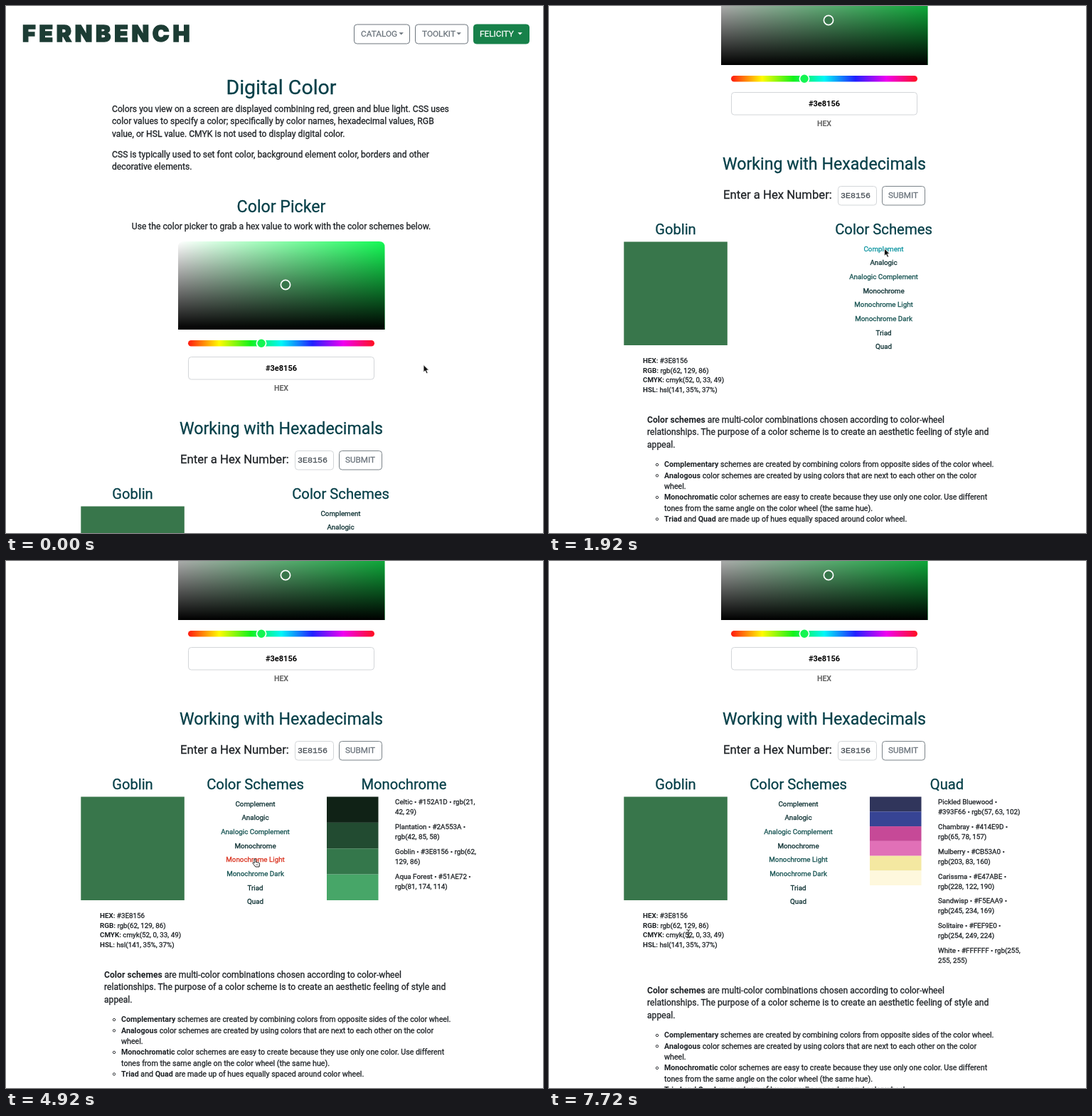
These frames come from a looping animation (755x741 px, 7.74 s). An HTML page:

```html
<!DOCTYPE html>
<html lang="en">
<head>
<meta charset="utf-8">
<title>Digital Color</title>
<style>
  html, body { margin: 0; width: 100%; height: 100%; overflow: hidden; background: #fff; }
  svg { display: block; }
  text {
    font-family: Roboto, sans-serif; white-space: pre;
    color: #1d2125; fill: currentColor; stroke: currentColor; stroke-width: .28;
  }
  .mid { text-anchor: middle; }
  .head { color: #063f48; }
  .btn { color: #6c757d; }
  .bold, tspan { font-weight: 700; stroke: none; }
  .mono { font-family: "Liberation Mono", monospace; color: #495057; }
  .logo { font-family: Inter, sans-serif; font-weight: 900; letter-spacing: 4.7px; color: #1c3c34; stroke-width: 1.4; }
</style>
</head>
<body>
<svg id="stage" width="755" height="741" viewBox="0 0 755 741"></svg>
<script>
const LOOP = 7740, SCROLL = 372;
const BODY = 12.17, SMALL = 9.8, LIST = 10.66;

const links = ['Complement', 'Analogic', 'Analogic Complement', 'Monochrome',
  'Monochrome Light', 'Monochrome Dark', 'Triad', 'Quad'];
const rowPitch = 19.68, rowTop = 713;

// Each entry: name and hex, with "|" where the caption wraps.
const schemes = [
  ['Cannon Pink #813E69 •|rgb'],
  ['Amazon #3C7651 • rgb(60,|', 'Viridian #3D7C6B • rgb(61,|', 'Oracle #3E7A81 • rgb(62,|', 'Bismark #3F6487 •|rgb'],
  ['Cosmic #763C61 • rgb(118,|', 'Camelot #7C3D4E • rgb(124,|', 'Lotus #81453E • rgb(129,|', 'Shingle #87623F • rgb(135,|'],
  ['Celtic #152A1D • rgb(21,|', 'Plantation #2A553A •|rgb', 'Goblin #3E8156 • rgb(62,|', 'Aqua Forest #51AE72 •|rgb'],
  ['Goblin #3E8156 • rgb(62,|', 'Aqua Forest #51AE72 •|rgb', 'Silver #BFBFBF • rgb(191,|', 'Alto #DFDFDF • rgb(223,|'],
  ['Celtic #152A1D • rgb(21,|', 'Plantation #2A553A •|rgb', 'Granite Gray #606060 •|rgb', 'Gray #7F7F7F • rgb(127,|'],
  ['Martinique #3A3666 •|rgb', 'Butterfly Bush #5A4A9D •|rgb', 'Santa Fe #B2754F •|rgb', 'Tacao #E0A97A • rgb(224,|'],
  ['Pickled Bluewood •|#393F66 • rgb', 'Chambray #414E9D •|rgb', 'Mulberry #CB53A0 •|rgb', 'Carissma #E47ABE •|rgb',
    'Sandwisp #F5EAA9 •|rgb', 'Solitaire #FEF9E0 •|rgb', 'White #FFFFFF • rgb(255,|']
];
const clicks = [2080, 2900, 3960, 4420, 4960, 5540, 6120, 6640];

// Pointer path: time, x, y
const path = [
  [0, 587, 504.5], [500, 587, 504.5], [900, 587, 512], [1250, 587, 512], [1880, 471.5, 341],
  [2150, 471.5, 341], [2650, 352, 361], [3050, 352, 361], [3450, 352, 380], [4040, 351, 380],
  [4320, 351, 400], [4500, 350, 400], [4780, 350, 419], [5080, 350, 419], [5400, 349, 440],
  [5650, 349, 440], [5940, 348, 461], [6220, 348, 461], [6480, 348, 479], [6900, 348, 479], [7560, 196, 524]
];

const text = (x, y, size, str, cls = '', color = '') =>
  `<text x="${x}" y="${y}" font-size="${size}" class="${cls}" ${color && `style="color:${color}"`}>${str}</text>`;
const box = (x, y, w, h, stroke, fill = '#fff') =>
  `<rect x="${x}" y="${y}" width="${w}" height="${h}" rx="4" fill="${fill}" stroke="${stroke}"/>`;
const caret = (x, fill) => `<path d="M${x} 37.3h6.4l-3.2 3.3z" fill="${fill}"/>`;
const lines = (x, y, pitch, size, rows) =>
  rows.map((row, i) => text(x, y + i * pitch, size, row)).join('');
const knob = (x, y, fill) =>
  `<circle cx="${x}" cy="${y}" r="6.6" fill="${fill}" stroke="#fff" stroke-width="1.7"/>`;
const stops = colors => colors.map((c, i) =>
  `<stop offset="${i / (colors.length - 1)}" stop-color="${c}"/>`).join('');

const channels = hex => hex.slice(1).match(/../g).map(c => parseInt(c, 16));
const screenTone = hex =>
  `rgb(${channels(hex).map(c => Math.round(255 * (c / 255) ** 1.12)).join()})`;

function header() {
  return text(23, 50, 32, 'FERNBENCH', 'logo') +
    box(489.5, 26, 78, 27, '#6c757d') + text(499, 43.2, 11.8, 'CATALOG', 'btn') + caret(552.5, '#6c757d') +
    box(575.5, 26, 74, 27, '#6c757d') + text(585, 43.2, 11.8, 'TOOLKIT', 'btn') + caret(633.5, '#6c757d') +
    box(657.5, 26, 78, 27, '#17814a', '#17814a') +
    text(666, 43.2, 11.8, 'FELICITY', 'btn', '#fff') + caret(719.5, '#fff');
}

function intro() {
  return text(387, 123.5, 28.5, 'Digital Color', 'head mid') +
    lines(149, 148.6, 17.5, BODY, [
      'Colors you view on a screen are displayed combining red, green and blue light. CSS uses',
      'color values to specify a color; specifically by color names, hexadecimal values, RGB',
      'value, or HSL value. CMYK is not used to display digital color.']) +
    lines(149, 212.8, 17.5, BODY, [
      'CSS is typically used to set font color, background element color, borders and other',
      'decorative elements.']);
}

function picker() {
  const area = 'M242 455V339q0-8 8-8H524.500q8 0 8 8V455z';
  return text(387, 290.3, 23.2, 'Color Picker', 'head mid') +
    text(387, 313.8, BODY, 'Use the color picker to grab a hex value to work with the color schemes below.', 'mid') +
    `<path d="${area}" fill="url(#sat)"/><path d="${area}" fill="url(#val)"/>` +
    knob(393, 392, '#38764b') +
    '<rect x="256" y="470" width="262" height="8.500" rx="4.250" fill="url(#hue)"/>' +
    knob(359, 474.2, '#14f552') +
    box(256.5, 493.5, 261, 31.5, '#d3d6d9') +
    text(387, 513, 11, '#3e8156', 'mid bold', '#000') +
    text(387, 540.8, 10.6, 'HEX', 'mid bold', '#666');
}

function hexForm() {
  return text(387, 602.3, 23.2, 'Working with Hexadecimals', 'head mid') +
    text(245, 642.5, 16.7, 'Enter a Hex Number:') +
    box(406.5, 625.5, 54, 26.5, '#d3d6d9') + text(410, 642, 11.67, '3E8156', 'mono') +
    box(468.5, 625.5, 60, 26.5, '#7b8389') + text(477, 642.4, 11.7, 'SUBMIT', 'btn');
}

function swatch() {
  const facts = [['HEX', '#3E8156'], ['RGB', 'rgb(62, 129, 86)'],
    ['CMYK', 'cmyk(52, 0, 33, 49)'], ['HSL', 'hsl(141, 35%, 37%)']];
  return text(178, 692.8, 20.1, 'Goblin', 'head mid') +
    '<rect x="105.300" y="703.500" width="145.500" height="145.500" fill="#38764b"/>' +
    lines(132, 873.6, 13.9, SMALL, facts.map(([k, v]) => `<tspan>${k}:</tspan> ${v}`));
}

function notes() {
  const bullets = [0, 1, 3, 5].map(i =>
    `<circle cx="152" cy="${1017 + i * 15.3}" r="1.700" fill="none" stroke="#1d2125" stroke-width=".9"/>`).join('');
  return lines(138, 957.6, 17.5, BODY, [
    '<tspan>Color schemes</tspan> are multi-color combinations chosen according to color-wheel',
    'relationships. The purpose of a color scheme is to create an aesthetic feeling of style and',
    'appeal.']) + bullets +
    lines(162, 1020.3, 15.3, LIST, [
      '<tspan>Complementary</tspan> schemes are created by combining colors from opposite sides of the color wheel.',
      '<tspan>Analogous</tspan> color schemes are created by using colors that are next to each other on the color',
      'wheel.',
      '<tspan>Monochromatic</tspan> color schemes are easy to create because they use only one color. Use different',
      'tones from the same angle on the color wheel (the same hue).',
      '<tspan>Triad</tspan> and <tspan>Quad</tspan> are made up of hues equally spaced around color wheel.']);
}

function panel(title, entries) {
  const h = 145.5 / entries.length;
  return text(559.5, 692.8, 20.2, title, 'head mid') + entries.map((entry, i) => {
    const hex = entry.match(/#\w{6}/)[0], [r, g, b] = channels(hex);
    let [first, second] = entry.replace(/(\w) #/, '$1 • #').split('|');
    second = second ? `${second}(${r}, ${g}, ${b})` : `${g}, ${b})`;
    return `<rect x="451" y="${703.5 + i * h}" width="72.500" height="${h}" fill="${screenTone(hex)}"/>` +
      lines(547, 713.8 + i * 34.9, 14, SMALL, [first, second]);
  }).join('');
}

const pointers = {
  arrow: '<path d="M0 0v10.500l2.400-2.200 1.800 4 1.900-.8-1.800-3.900h3.300z" fill="#111" stroke="#fff" stroke-width=".8"/>',
  hand: '<path d="M-1 1q0-1.500 1.100-1.500T1.200 1v3.500l4 .7q1.500.3 1.400 2L6 11H.8L-2.700 6.500q-.8-1.200.2-1.600T-1 6z" fill="#fff" stroke="#222" stroke-width="1"/><path d="M2 7v2M4 7v2" stroke="#222" stroke-width=".6"/>',
  beam: '<path d="M-2.500-5.500Q0-5.500 0-4Q0-5.500 2.500-5.500M0-4V4.500M-2.500 6Q0 6 0 4.500Q0 6 2.500 6M-1.500 1h3" fill="none" stroke="#222" stroke-width="1"/>'
};

const stage = document.getElementById('stage');
stage.innerHTML = `<defs>
  <linearGradient id="sat">${stops(['#fff', '#14fa55'])}</linearGradient>
  <linearGradient id="val" x2="0" y2="1"><stop stop-opacity="0"/><stop offset="1"/></linearGradient>
  <linearGradient id="hue">${stops(['#ff1a10', '#fffb00', '#14f21a', '#00f7f7', '#2020ff', '#f000f0', '#ff1020'])}</linearGradient>
  </defs><g id="page">${header() + intro() + picker() + hexForm() + swatch()}
  <g id="menu">${text(0, 692.8, 20.3, 'Color Schemes', 'head mid')}
  ${links.map((name, i) => text(0, rowTop + 3.6 + i * rowPitch, SMALL, name, 'mid link')).join('')}</g>
  ${schemes.map((entries, i) => `<g class="panel">${panel(links[i], entries)}</g>`).join('')}
  <g id="notes">${notes()}</g></g><g id="pointer">
  ${Object.entries(pointers).map(([kind, shape]) => `<g id="${kind}">${shape}</g>`).join('')}</g>`;

const find = id => document.getElementById(id);
const page = find('page'), menu = find('menu'), notesGroup = find('notes'), pointer = find('pointer');
const linkNodes = [...document.querySelectorAll('.link')];
const panelNodes = [...document.querySelectorAll('.panel')];
const move = (node, x, y) => node.setAttribute('transform', `translate(${x} ${y})`);
const show = (node, on) => node.setAttribute('visibility', on ? 'visible' : 'hidden');

// Damped scroll with a slight overshoot so that it comes to a full stop.
function scrollAt(t) {
  const a = Math.max(0, t - 752) * 0.0074;
  return Math.min(SCROLL, Math.round(SCROLL * 1.02 * (1 - (1 + a) * Math.exp(-a))));
}

function pointerAt(t) {
  const next = path.findIndex(p => p[0] > t);
  if (next < 0) return path[path.length - 1].slice(1);
  const [t0, x0, y0] = path[next - 1], [t1, x1, y1] = path[next];
  const u = (t - t0) / (t1 - t0), e = u * u * (3 - 2 * u);
  return [x0 + (x1 - x0) * e, y0 + (y1 - y0) * e];
}

function draw(t) {
  const scroll = scrollAt(t), [x, y] = pointerAt(t);
  const open = clicks.filter(c => c <= t).length - 1;
  const column = open < 0 ? 470.5 : 350.5;
  const row = Math.round((y + scroll - rowTop) / rowPitch);
  const over = row in links && Math.abs(x - column) < links[row].length * 2.6 ? row : -1;
  const pressed = clicks.some(c => t >= c - 80 && t < c + 20);

  move(page, 0, -scroll);
  move(menu, column, 0);
  move(notesGroup, 0, open === 7 ? 22 : 0);
  panelNodes.forEach((node, i) => show(node, i === open));
  linkNodes.forEach((node, i) => {
    const rest = /c .|e ./.test(links[i]) ? '#12504f' : '#0a2e30';
    node.style.color = i !== over ? rest : pressed ? '#d9301c' : '#0a939f';
  });

  const kind = t > 7480 ? 'beam' : over >= 0 && t > 1960 ? 'hand' : 'arrow';
  for (const k in pointers) show(find(k), k === kind);
  move(pointer, x, y);
}

const start = performance.now();
function tick() {
  draw((performance.now() - start) % LOOP);
  requestAnimationFrame(tick);
}
tick();
</script>
</body>
</html>
```
